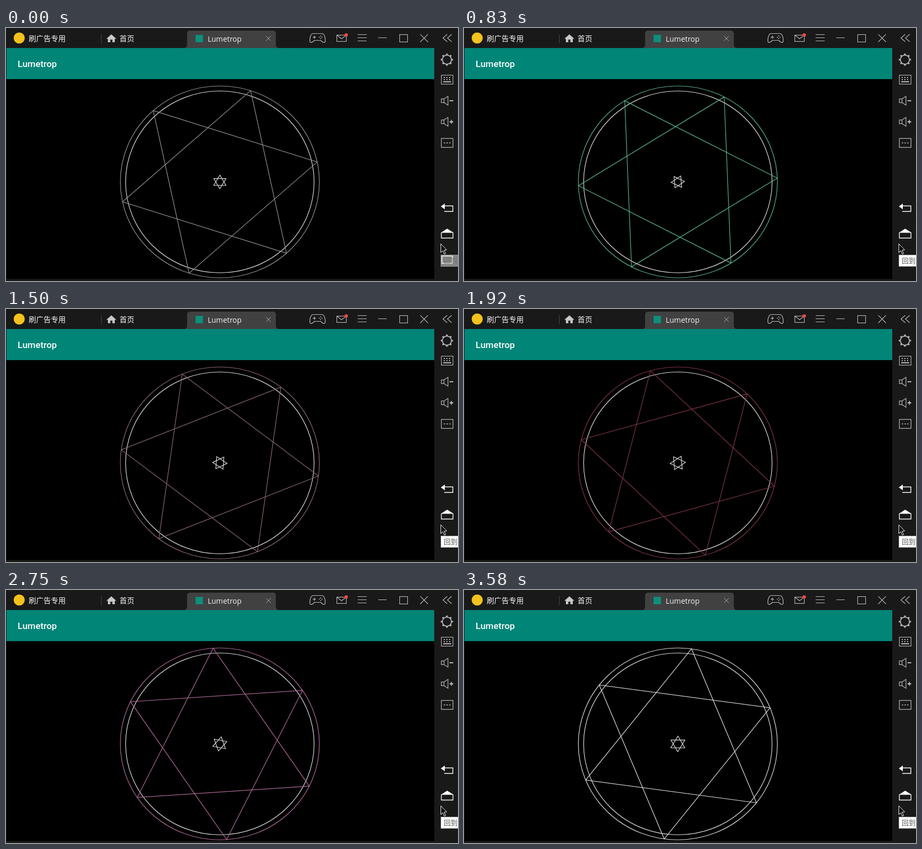
Write an HTML page with a canvas that moves like this. It is 856 by 480 pixels and loops after 3660 ms.

```html
<!DOCTYPE html>
<html lang="zh">
<head>
<meta charset="utf-8">
<style>
html, body { margin: 0; width: 100%; height: 100%; overflow: hidden; background: #000; }
canvas { display: block; }
</style>
</head>
<body>
<canvas id="stage" width="856" height="480"></canvas>
<script>
const ctx = document.getElementById('stage').getContext('2d');
const LOOP = 3660, STEPS = 44, TAU = Math.PI * 2;
const WARMUP = 7;
const CX = 405, CY = 292;
const CHROME = '#19191a', ICON = '#bcbcbe', WHITE = '#f4f4f4', TEAL = '#008577';
const CJK = '"Noto Sans CJK SC", "Noto Sans CJK", sans-serif';
const NAME = 'Lumetrop';

// colour of the big star: step, then red, green, blue
const TINTS = [
  [0, 150, 148, 150],
  [7, 44, 204, 152],
  [14, 152, 148, 152],
  [23, 130, 54, 76],
  [33, 178, 108, 156],
  [39, 152, 78, 104],
  [43, 226, 222, 224]
];

const mix = (a, b, k) => a + (b - a) * k;

function tint(step) {
  const n = TINTS.findIndex(stop => stop[0] >= step);
  const b = TINTS[n], a = TINTS[Math.max(0, n - 1)];
  const k = (step - a[0]) / (b[0] - a[0] || 1);
  const rgb = a.slice(1).map((v, i) => Math.round(mix(v, b[i + 1], k)));
  return `rgb(${rgb})`;
}

// slow warm-up, then a turn that eases off slightly
function turn(step, base, rate, lag) {
  const d = step - WARMUP;
  return base + rate * d * (d < 0 ? lag : 1.05 - 0.0014 * d);
}

const coreSize = step => 12.3 + 0.055 * step + 0.6 * Math.cos(step * TAU / 24);

function box(x, y, w, h, color) {
  ctx.fillStyle = color;
  ctx.fillRect(x, y, w, h);
}

function pen(color, width = 1) {
  ctx.strokeStyle = color;
  ctx.lineWidth = width;
}

function trace(points, closed) {
  ctx.beginPath();
  points.forEach(([x, y]) => ctx.lineTo(x, y));
  if (closed) ctx.closePath();
}

function line(...points) {
  trace(points, false);
  ctx.stroke();
}

function outline(...points) {
  trace(points, true);
  ctx.stroke();
}

function shape(color, ...points) {
  trace(points, true);
  ctx.fillStyle = color;
  ctx.fill();
}

function frame(x, y, w, h) {
  ctx.strokeRect(x + 0.5, y + 0.5, w, h);
}

function disc(x, y, r, color) {
  ctx.beginPath();
  ctx.arc(x, y, r, 0, TAU);
  ctx.fillStyle = color;
  ctx.fill();
}

function label(text, x, y, font, color) {
  ctx.font = font;
  ctx.fillStyle = color;
  ctx.fillText(text, x, y);
}

function ring(rx, ry) {
  ctx.beginPath();
  ctx.ellipse(CX, CY, rx, ry, 0, 0, TAU);
  ctx.stroke();
}

function star(rx, ry, deg) {
  for (const half of [0, 60]) {
    outline(...[0, 120, 240].map(d => {
      const a = (deg + half + d) * TAU / 360;
      return [CX + rx * Math.sin(a), CY - ry * Math.cos(a)];
    }));
  }
}

function cross(x, y, r) {
  line([x - r, y - r], [x + r, y + r]);
  line([x - r, y + r], [x + r, y - r]);
}

function tab() {
  ctx.fillStyle = '#414142';
  ctx.beginPath();
  ctx.moveTo(338, 38);
  ctx.quadraticCurveTo(343, 37, 343, 31);
  ctx.arcTo(343, 5, 348, 5, 5);
  ctx.arcTo(511, 5, 511, 10, 5);
  ctx.lineTo(511, 31);
  ctx.quadraticCurveTo(511, 37, 516, 38);
  ctx.fill();
  box(359, 13, 14, 14, '#0b8f7b');
  label(NAME, 382, 26, '14px "Open Sans", "Noto Sans", sans-serif', WHITE);
  pen('#a6a6a8');
  cross(497, 20, 4.5);
}

function gamepad() {
  pen(ICON, 1.2);
  ctx.beginPath();
  ctx.moveTo(582, 10.5);
  ctx.lineTo(598, 10.5);
  ctx.bezierCurveTo(603, 10.5, 605, 19, 604.5, 25);
  ctx.bezierCurveTo(604, 29, 600, 28, 596, 23.5);
  ctx.lineTo(584, 23.5);
  ctx.bezierCurveTo(580, 28, 576, 29, 575.5, 25);
  ctx.bezierCurveTo(575, 19, 577, 10.5, 582, 10.5);
  ctx.stroke();
  line([581, 17.5], [587, 17.5]);
  line([584, 14.5], [584, 20.5]);
  for (let i = 0; i < 4; i++) {
    const a = i * TAU / 4;
    disc(596 + 2.5 * Math.cos(a), 17.5 + 2.5 * Math.sin(a), 0.9, ICON);
  }
}

function titleBar() {
  disc(25, 19, 10.5, '#f4c21c');
  label('刷广告专用', 43, 24.5, '14px ' + CJK, WHITE);
  box(180, 12, 1, 17, '#48484a');
  shape('#c8c8ca', [190, 20.5], [199.5, 12], [209, 20.5], [206, 20.5], [206, 27],
    [201.5, 27], [201.5, 22], [197.5, 22], [197.5, 27], [193, 27], [193, 20.5]);
  label('首页', 215, 25, '14px ' + CJK, WHITE);
  tab();
  gamepad();

  pen(ICON, 1.1);
  frame(626, 13, 18, 12);
  line([626.5, 13.5], [635.5, 20.5], [644.5, 13.5]);
  disc(644.3, 13.3, 3.2, '#f5493a');
  for (const y of [13, 19, 25]) box(666, y - 1, 17, 1, ICON);
  box(705, 18, 16, 1, ICON);
  frame(745, 12, 15, 14);
  cross(791.8, 19.2, 7.3);
}

function speaker(y) {
  pen(ICON, 1.2);
  frame(824, y - 4, 5, 7);
  line([829.5, y - 3.5], [837, y - 8.5], [837, y + 8.5], [829.5, y + 3.5]);
  box(840, y - 1, 7, 2, ICON);
}

function gear() {
  pen(ICON, 1.6);
  ctx.beginPath();
  ctx.arc(835, 60, 8.6, 0, TAU);
  ctx.stroke();
  pen(ICON, 3);
  for (let i = 0; i < 8; i++) {
    const c = Math.cos(i * TAU / 8), s = Math.sin(i * TAU / 8);
    line([835 + 8.5 * c, 60 + 8.5 * s], [835 + 11.5 * c, 60 + 11.5 * s]);
  }
}

function sideBar() {
  pen(ICON, 1.2);
  for (const x of [835.5, 844]) line([x, 12], [x - 8, 19], [x, 26]);
  gear();

  pen(ICON, 1.1);
  frame(824, 89, 22, 17);
  for (const y of [93, 97]) for (let x = 829; x < 844; x += 5) box(x, y, 2, 2, ICON);
  box(828, 101, 15, 2, ICON);
  speaker(138);
  speaker(178);
  box(842.5, 174.5, 2, 7, ICON);
  frame(824, 209, 22, 17);
  for (let x = 829; x < 840; x += 5) box(x + 0.5, 217, 2, 2, ICON);

  pen('#fff', 1.4);
  line([829, 337.5], [846.3, 337.5], [846.3, 348], [830, 348]);
  shape('#fff', [823.5, 338.5], [831, 333], [831, 344]);
  outline([824.5, 388.5], [835.5, 381.5], [846.5, 388.5], [846.5, 398.5], [824.5, 398.5]);
  shape('#fff', [824.5, 388.5], [835.5, 381.5], [846.5, 388.5]);
  frame(825, 432, 20, 14);
}

function tooltip(alpha) {
  ctx.globalAlpha = alpha;
  box(823, 430, 33, 23, '#fff');
  pen('#767676');
  frame(823, 430, 40, 22);
  label('回到', 829, 446, '13px ' + CJK, '#575757');
  ctx.globalAlpha = 1;
}

function cursor() {
  const arrow = [[823.5, 409.5], [823.5, 426], [827.3, 422.5], [830, 429], [832.5, 428],
    [829.8, 421.5], [834.5, 421]];
  shape('#0b0b0b', ...arrow);
  pen('#f6f6f6');
  outline(...arrow);
}

function rings(step) {
  pen('#dededf', 1.2);
  ring(178.5, 172.5);
  const r = coreSize(step);
  star(r * 1.03, r, turn(step, 8, -13.55, 0.55));
  pen(tint(step), 1.2);
  ring(188.5, 182);
  star(188.5, 182, turn(step, 23.9, 1.222, 0.69));
}

function draw(step) {
  box(0, 0, 856, 480, CHROME);
  box(1, 97, 810, 379, '#000');
  titleBar();
  box(1, 38, 810, 59, TEAL);
  label(NAME, 22, 73.5, '500 17.3px Roboto, sans-serif', '#fff');
  rings(step);
  sideBar();
  tooltip(Math.min(1, 0.48 + step * 0.26));
  cursor();
}

// twelve steps a second, with a little slack for starts rounded to 10 ms
function tick() {
  const t = performance.now() % LOOP;
  draw(Math.min(STEPS - 1, Math.floor((t + 3.5) * 0.012)));
  requestAnimationFrame(tick);
}
tick();
</script>
</body>
</html>
```
